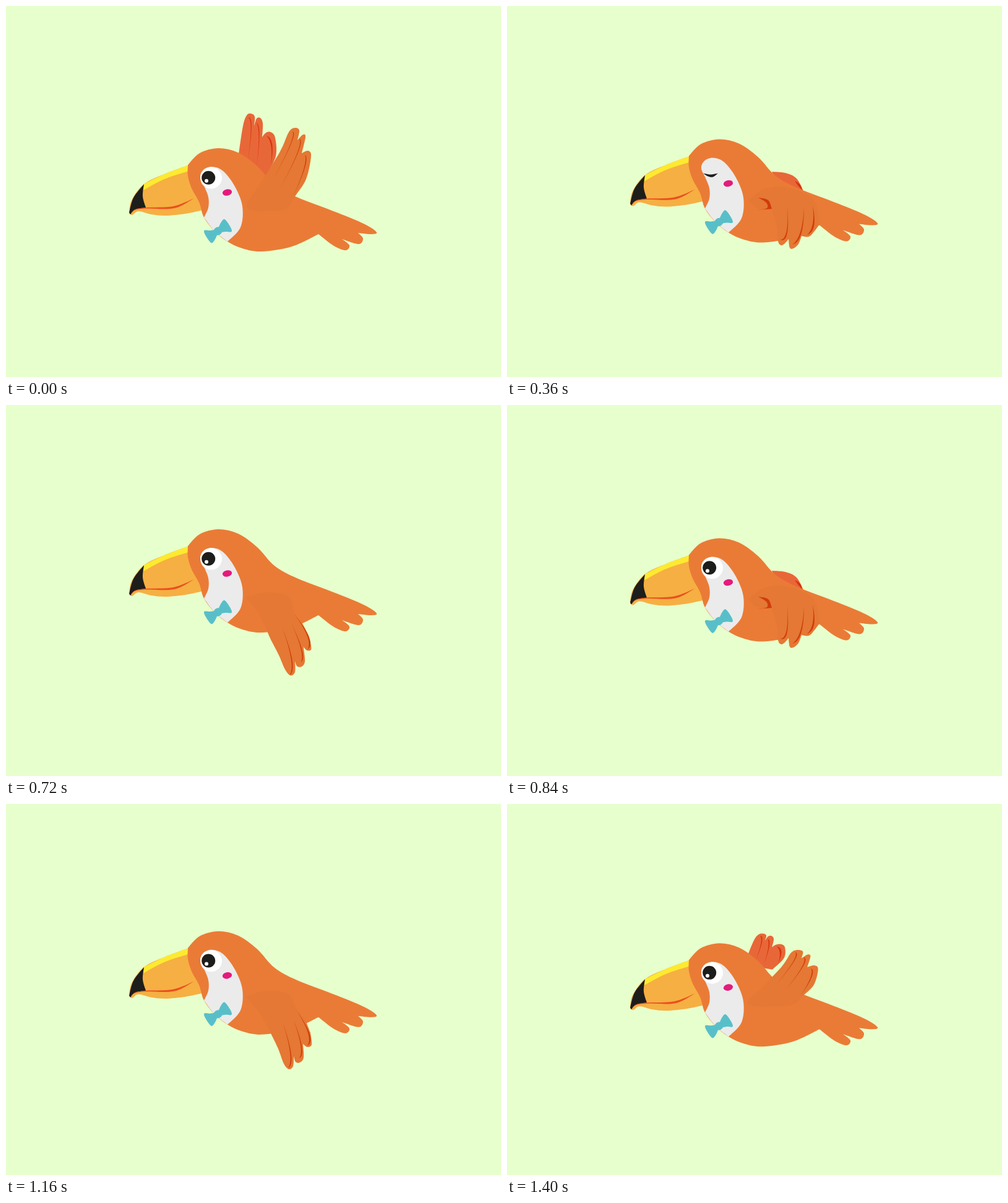
Write an HTML page with a canvas that moves like this. It is 800 px wide and 600 px high and loops after 1440 ms.

```html
<!DOCTYPE html>
<html lang="en">
<head>
<meta charset="utf-8">
<title>Flying toucan</title>
<style>
html, body { margin: 0; width: 100%; height: 100%; overflow: hidden; background: #e7ffcc; }
canvas { display: block; }
</style>
</head>
<body>
<canvas id="stage" width="800" height="600"></canvas>
<script>
const ctx = document.getElementById('stage').getContext('2d');
const STEP = 40, STEPS = 36, BEAT = 12, RISE = 4.83;

const colors = {
  sky: '#e7ffcc', body: '#ea7b36', nearWing: '#e47834', farWing: '#e86738',
  nearLine: '#d13b0a', farLine: '#d5330e', face: '#ebebeb', beak: '#f6af42',
  ridge: '#fdea30', dark: '#1d1d1b', mouth: '#e9501f', bow: '#58bfc9', cheek: '#e51a7c'
};

const parse = text => text.split(',').map(pair => pair.trim().split(' ').map(Number));

// Fills a smooth closed curve through the points; "|" marks a sharp corner.
function shape(color, text) {
  ctx.beginPath();
  let last;
  for (const part of text.split('|')) {
    const pts = parse(part);
    if (last) pts.unshift(last);
    else ctx.moveTo(...pts[0]);
    const at = i => pts[Math.max(0, Math.min(pts.length - 1, i))];
    for (let i = 0; i + 1 < pts.length; i++) {
      const [a, b, c, d] = [at(i - 1), at(i), at(i + 1), at(i + 2)];
      ctx.bezierCurveTo(b[0] + (c[0] - a[0]) / 6, b[1] + (c[1] - a[1]) / 6,
        c[0] - (d[0] - b[0]) / 6, c[1] - (d[1] - b[1]) / 6, ...c);
    }
    last = pts[pts.length - 1];
  }
  ctx.fillStyle = color;
  ctx.fill();
}

// Fills a tapered feather line given as root, bend and tip.
function quill(color, text) {
  const [root, bend, tip] = parse(text);
  const dx = (root[0] + tip[0]) / 2 - bend[0];
  const dy = (root[1] + tip[1]) / 2 - bend[1];
  const k = 7 / Math.hypot(dx, dy);
  ctx.beginPath();
  ctx.moveTo(...root);
  ctx.quadraticCurveTo(...bend, ...tip);
  ctx.quadraticCurveTo(bend[0] + dx * k, bend[1] + dy * k, ...root);
  ctx.fillStyle = color;
  ctx.fill();
}

function oval(color, x, y, rx, ry = rx, angle = 0) {
  ctx.fillStyle = color;
  ctx.beginPath();
  ctx.ellipse(x, y, rx, ry, angle, 0, 7);
  ctx.fill();
}

function blend(a, b, t) {
  const ends = b.match(/[\d.]+/g);
  let i = 0;
  return a.replace(/[\d.]+/g, n => +n + (ends[i++] - n) * t);
}

const warp = (text, move) =>
  text.replace(/([\d.]+) ([\d.]+)/g, (_, x, y) => move(+x, +y).join(' '));

const warpWing = (wing, move) => ({
  outline: warp(wing.outline, move),
  quills: wing.quills.map(q => warp(q, move))
});

const blendWing = (a, b, t) => ({
  outline: blend(a.outline, b.outline, t),
  quills: a.quills.map((q, i) => blend(q, b.quills[i], t))
});

const raisedNear = {
  outline: '404 298, 442 237, 457 204, 467 197, 474 201, 471 217 | 480 208, 484 212, 478 238 | 488 234, 493 243, 485 280, 467 308, 454 327, 430 331, 395 330, 390 318, 404 298',
  quills: ['432 280, 474 204, 463 203', '444 293, 486 217, 474 215', '464 308, 493 247, 483 241']
};

const raisedFar = {
  outline: '376 240, 383 194, 389 177, 396 174, 402 179, 401 194 | 405 182, 411 181, 415 190, 414 212 | 420 205, 428 204, 435 213, 436 243, 420 275 | 385 265',
  quills: ['391 248, 402 180, 392 180', '405 260, 414 193, 405 189', '428 257, 436 214, 421 210']
};

const levelNear = {
  outline: '392 318, 404 305, 440 304, 470 297, 481 300, 481 308, 510 320, 507 337, 486 343, 430 336, 392 318',
  quills: ['419 320, 434 325, 447 318', '446 332, 472 324, 476 311', '462 337, 484 331, 492 320', '485 339, 499 342, 506 332']
};

const levelFar = {
  outline: '431 279, 434 267, 443 267, 444 281 | 452 271, 461 273, 461 286 | 471 278, 482 281, 479 293, 464 298 | 440 290',
  quills: ['440 286, 445 282, 442 278', '454 293, 462 288, 460 280', '466 297, 477 297, 478 288']
};

const foldedNear = {
  outline: '390 314, 405 327, 428 329 | 436 355, 438 380, 443 387, 449 384, 455 377 | 457 391, 463 392, 471 385, 476 372 | 488 373, 497 364, 505 353 | 500 322, 485 305, 450 293, 415 296, 390 314',
  quills: ['453 324, 458 385, 442 378', '480 326, 480 382, 461 386', '494 323, 503 364, 485 370']
};

const foldedFar = {
  outline: '428 268, 450 270, 468 279, 480 301 | 440 290',
  quills: ['465 283, 476 287, 477 298']
};

const crease = '406 310, 422 314, 428 328 | 403 330 | 420 327, 419 318, 406 310';

const loweredNear = {
  outline: '388 312, 408 336, 428 371 | 440 396, 449 420, 457 429, 464 424, 465 408 | 468 417, 475 418, 481 410, 480 388 | 487 393, 494 389, 492 370 | 483 349, 469 331, 455 307, 420 302, 388 312',
  quills: ['448 355, 470 420, 456 427', '465 350, 487 405, 474 411', '471 336, 503 382, 487 391']
};

// Wing poses from fully up to fully down, in stage coordinates.
const poses = [
  { near: raisedNear, far: raisedFar },
  {
    near: warpWing(raisedNear, (x, y) => [1.149 * x + 0.063 * y - 79, 0.68 * y + 102]),
    far: warpWing(raisedFar, (x, y) => [x - 0.085 * y + 32.3, 0.575 * y + 109.5])
  },
  { near: levelNear, far: levelFar },
  { near: foldedNear, far: foldedFar, crease },
  { near: blendWing(foldedNear, loweredNear, 0.5) },
  { near: loweredNear },
  { near: blendWing(foldedNear, loweredNear, 1.2) }
];

function drawWing(wing, color, lineColor) {
  shape(color, wing.outline);
  wing.quills.forEach(q => quill(lineColor, q));
}

function drawBeak() {
  shape(colors.beak, '296 257, 258 271, 223 288, 203 314, 199 335 | 204 338, 214 332, 235 337, 258 339, 290 336, 318 330');
  shape(colors.ridge, '296 257, 258 271, 223 288 | 220 299 | 256 280, 298 266');
  shape(colors.dark, '223 288, 206 310, 199 334 | 201 337 | 209 329, 226 326 | 221 308, 223 288');
  shape(colors.mouth, '200 336, 209 329, 226 326, 270 324, 304 311 | 272 327, 226 327.5, 209 330, 200 336');
}

function drawTorso() {
  shape(colors.body, '294 257, 313 238, 343 230, 375 237, 406 259, 434 289, 470 309, 535 334, 580 353, 599 366, 590 369, 569 367 | 577 376, 570 385, 543 377 | 555 387, 549 395, 530 388, 505 369 | 462 389, 413 397, 382 392, 358 381, 337 364, 320 342, 312 317, 300 295, 294 275, 294 257');
}

function drawEye(step) {
  const fromShut = Math.abs(step - 8);
  if (fromShut < 2) {
    shape(colors.dark, '317 285, 329 287, 341 285 | 333 291, 325 290, 317 285');
    return;
  }
  ctx.save();
  ctx.beginPath();
  ctx.rect(300, 300 - 8 * Math.min(6, fromShut), 70, 60);
  ctx.clip();
  oval('#fff', 331.5, 278, 17.5);
  oval(colors.dark, 327.2, 277.7, 11);
  oval('#fff', 324, 282.7, 3);
  ctx.restore();
}

function drawBow() {
  ctx.save();
  ctx.translate(342.5, 364);
  for (let side = 0; side < 2; side++) {
    shape(colors.bow, '0 -3, -12 -1, -22 -1, -20 7, -11 19, -5 14, 0 3');
    ctx.rotate(Math.PI);
  }
  oval(colors.bow, 0, 0, 7.2, 6.5, -0.5);
  ctx.restore();
}

function drawFace(step) {
  shape(colors.face, '320 342, 327 326, 327 309, 321 293, 314 277, 319 265, 333 260, 351 267, 370 292, 382 324, 379 358, 358 381 | 337 364, 320 342');
  drawEye(step);
  oval(colors.cheek, 357.5, 301.5, 7.7, 5.2, -0.2);
}

function render(now) {
  const step = Math.floor(now / STEP) % STEPS;
  const beat = step % BEAT;
  const height = Math.min(beat, BEAT - beat);
  const pose = poses[height];

  ctx.fillStyle = colors.sky;
  ctx.fillRect(0, 0, 800, 600);
  if (pose.far) drawWing(pose.far, colors.farWing, colors.farLine);
  ctx.save();
  ctx.translate(0, -RISE * height);
  drawBeak();
  drawTorso();
  drawFace(step);
  drawBow();
  ctx.restore();
  drawWing(pose.near, colors.nearWing, colors.nearLine);
  if (pose.crease) shape(colors.nearLine, pose.crease);
}

const start = performance.now();
function tick() {
  render(performance.now() - start);
  requestAnimationFrame(tick);
}
tick();
</script>
</body>
</html>
```
